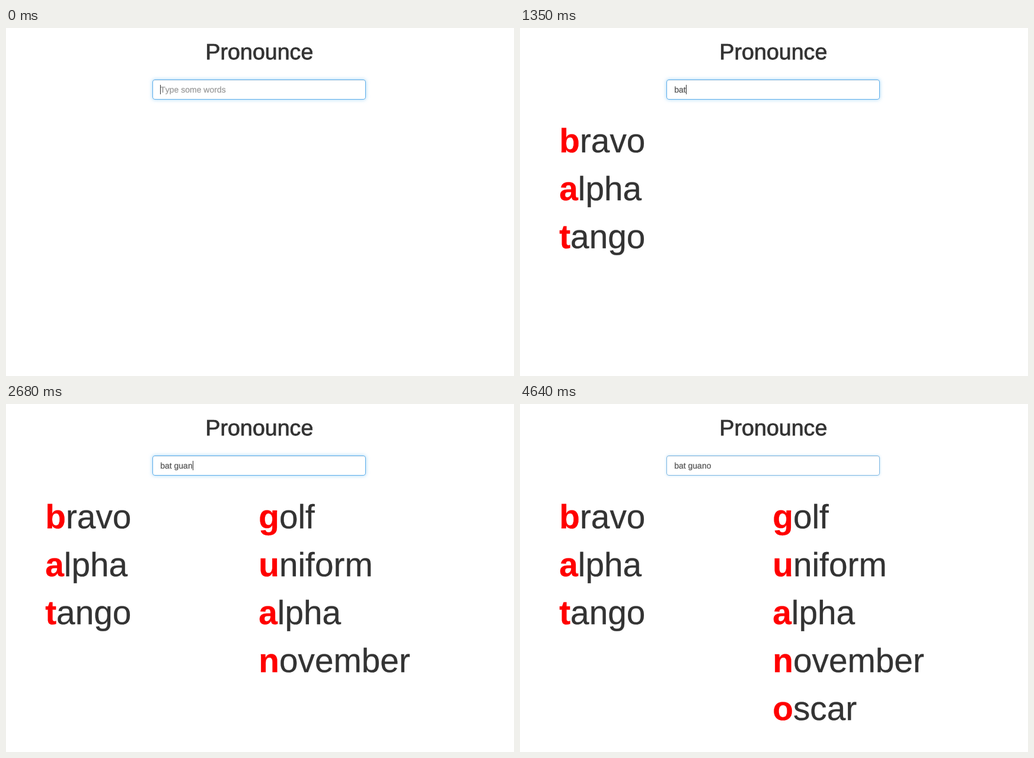
Recreate the animation shown at these times as an HTML page. Size 857x588 px, loop 4.74 s.

```html
<!DOCTYPE html>
<html lang="en">
<head>
<meta charset="utf-8">
<title>Pronounce</title>
<style>
  html, body {
    margin: 0;
    width: 100%;
    height: 100%;
    overflow: hidden;
    background: #fff;
  }
  #field {
    position: absolute;
    left: 247px;
    top: 87px;
    width: 360px;
    height: 34px;
    box-sizing: border-box;
    border: 1px solid;
    border-radius: 4px;
  }
  svg {
    position: absolute;
    left: 0;
    top: 0;
    font-family: "Liberation Sans", Arial, sans-serif;
    text-rendering: geometricPrecision;
  }
  text { white-space: pre; fill: #333; }
  #title { font-size: 37.6px; stroke: #333; stroke-width: .8px; }
  #typed, #hint { font-size: 14px; fill: #555; stroke: #555; stroke-width: .25px; }
  #hint { fill: #999; stroke: #999; font-kerning: none; }
  #words text { font-size: 56.8px; stroke: #333; stroke-width: .3px; }
  #words tspan { font-weight: bold; fill: #f00; stroke: #f00; }
</style>
</head>
<body>
<div id="field"></div>
<svg width="857" height="588" viewBox="0 0 857 588">
  <text id="title" x="427.4" y="53" text-anchor="middle">Pronounce</text>
  <text id="hint" x="260.2" y="109">Type some words</text>
  <text id="typed" x="260.2" y="109"></text>
  <rect id="caret" y="96" width="1" height="16" fill="#333"/>
  <g id="words"></g>
</svg>
<script>
const LOOP = 4740;
const PHRASE = "bat guano";
const SPELLING = {
  b: "bravo", a: "alpha", t: "tango", g: "golf",
  u: "uniform", n: "november", o: "oscar"
};
// [start ms, letters typed, letters spelled out]
const STEPS = [
  [0, 0, 0], [750, 1, 1], [900, 2, 1], [1050, 2, 2], [1350, 3, 3],
  [1800, 4, 3], [2100, 5, 4], [2240, 6, 5], [2390, 7, 6],
  [2540, 8, 7], [2680, 8, 8], [2830, 9, 8], [2980, 9, 9]
];
const BLUR_AT = 4640;

const $ = id => document.getElementById(id);
const show = (el, on) => el.setAttribute("visibility", on ? "visible" : "hidden");

function addWord(letter, column, row) {
  const word = document.createElementNS("http://www.w3.org/2000/svg", "text");
  word.setAttribute("x", 66.2 + 360 * column);
  word.setAttribute("y", 210 + 81 * row);
  word.innerHTML = `<tspan>${letter}</tspan>${SPELLING[letter].slice(1)}`;
  $("words").append(word);
  return word;
}

// One entry per typed character; a space starts the next column.
let column = 0, row = 0;
const words = [...PHRASE].map(letter => {
  if (letter === " ") {
    column++;
    row = 0;
    return null;
  }
  return addWord(letter, column, row++);
});

function drawField(focus) {
  const mix = (from, to) => Math.round(from + (to - from) * focus);
  const style = $("field").style;
  style.borderColor = `rgb(${mix(204, 92)}, ${mix(204, 174)}, ${mix(204, 235)})`;
  style.boxShadow = "inset 0 1px 1px rgba(0, 0, 0, .075), " +
    `0 0 ${6 * focus}px rgba(102, 185, 240, ${.6 * focus})`;
}

let lastStep = null;

function drawStep(step) {
  if (step === lastStep) return;
  lastStep = step;
  const [, typed, spelled] = step;
  $("typed").textContent = PHRASE.slice(0, typed);
  show($("hint"), typed === 0);
  words.forEach((word, i) => word && show(word, i < spelled));
  const width = typed ? $("typed").getComputedTextLength() : 0;
  $("caret").setAttribute("x", 260 + Math.ceil(width - .05));
}

function frame() {
  const t = performance.now() % LOOP;
  drawStep(STEPS.findLast(step => step[0] <= t));
  show($("caret"), t < 3430 || (t >= 3880 && t < 4480));
  drawField(t < BLUR_AT ? 1 : .7);
  requestAnimationFrame(frame);
}
frame();
</script>
</body>
</html>
```
